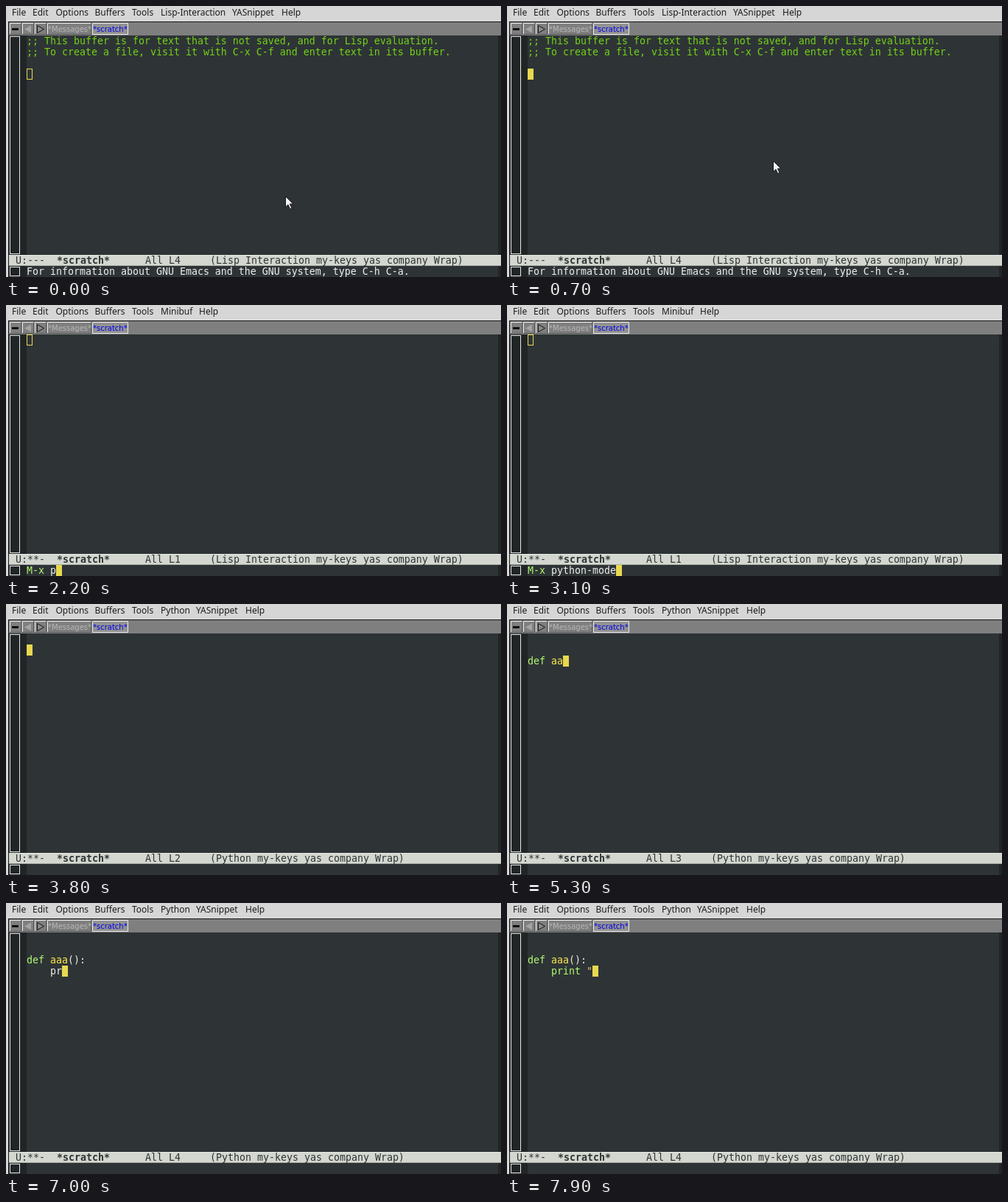
Recreate the animation shown at these times as an HTML page. Size 672 by 368 pixels, loop 8000 ms.

```html
<!DOCTYPE html>
<html lang="en">
<head>
<meta charset="utf-8">
<title>Editor session</title>
<style>
  html, body { margin: 0; width: 100%; height: 100%; overflow: hidden; background: #2e3436; }
  svg { display: block; width: 672px; height: 368px; }
  text { white-space: pre; }
  .mono { font: 13.29px "DejaVu Sans Mono", monospace; fill: #eeeeec; }
  .menu { font: 12px "Noto Sans", "Open Sans", sans-serif; fill: #1c1c1c; }
  .tab { font: 10px "DejaVu Sans", sans-serif; }
  .status { fill: #2e3436; }
  .frame { fill: none; stroke: #e8e8e8; }
</style>
</head>
<body>
<svg viewBox="0 0 672 368">
  <!-- window background and fringes -->
  <rect width="672" height="368" fill="#2e3436"/>
  <rect x="4" y="40" width="24" height="298" fill="#212526"/>
  <rect x="668" y="40" width="4" height="298" fill="#212526"/>
  <rect x="4" y="353" width="24" height="15" fill="#212526"/>
  <rect x="668" y="353" width="4" height="15" fill="#212526"/>

  <!-- menu bar -->
  <rect width="672" height="21" fill="#d6d6d6"/>
  <rect y="20" width="3" height="348" fill="#d6d6d6"/>
  <rect x="3" y="21" width="669" height="1" fill="#161616"/>
  <rect x="3" y="21" width="1" height="347" fill="#161616"/>
  <g id="menu" class="menu"></g>

  <!-- tab bar -->
  <rect x="4" y="22" width="668" height="18" fill="#7f7f7f"/>
  <g class="frame">
    <path d="M5.5 39V23.5H20M22.5 39V23.5H37M39.5 39V23.5H54M56.5 39V23.5H115M118 23.5H165.5V38.5H117.5V23.5"/>
  </g>
  <path d="M5 38.5H20.5V24M22 38.5H37.5V24M39 38.5H54.5V24M56 38.5H115.5V24" fill="none" stroke="#5c5c5c"/>
  <rect x="118" y="24" width="47" height="14" fill="#929292"/>
  <rect x="8" y="30" width="9" height="3" fill="#111"/>
  <path d="M34 26.5V36.5L25 31.5Z" fill="#a4a4a4"/>
  <path d="M42.5 26.5V36.5L51.5 31.5Z" fill="#8a8a8a" stroke="#111"/>
  <text class="tab" x="57" y="35" fill="#b8b8b8">*Messages*</text>
  <text class="tab" x="118" y="35" fill="#0000ee">*scratch*</text>

  <!-- scroll bars -->
  <rect class="frame" x="5.5" y="41.5" width="13" height="295"/>
  <rect class="frame" x="5.5" y="354.5" width="13" height="12"/>

  <!-- mode line -->
  <rect x="4" y="338" width="668" height="15" fill="#d3d7cf"/>
  <rect x="4" y="338" width="668" height="1" fill="#e6e9e2"/>
  <rect x="4" y="352" width="668" height="1" fill="#a9ada5"/>
  <g class="mono">
    <text id="flags" class="status" x="13" y="350"></text>
    <text class="status" x="69" y="350" font-weight="bold">*scratch*</text>
    <text id="place" class="status" x="189" y="350"></text>
    <text id="modes" class="status" x="277" y="350"></text>
  </g>

  <g id="buffer" class="mono"></g>
  <path id="mouse" d="M.5 .5V15L4 11.8L6.6 17.6L9 16.5L6.4 10.9H11Z" fill="#f4f4f4" stroke="#151515"/>
</svg>

<script>
const LOOP = 8000, STEP = 100, COL = 8, ROW = 15, LEFT = 28, TOP = 40, ECHO = 353;
const YELLOW = "#e8d850", GREEN = "#b4fa70", BLUE = "#4f94cd";
const $ = id => document.getElementById(id);

const baseMenu = [[8, "File"], [36, "Edit"], [67.5, "Options"], [120.5, "Buffers"], [171, "Tools"]];
const menus = {
  lisp: [[210, "Lisp-Interaction"], [307, "YASnippet"], [374, "Help"]],
  minibuf: [[210, "Minibuf"], [262, "Help"]],
  python: [[210, "Python"], [258, "YASnippet"], [325, "Help"]]
};
const intro = [
  ";; This buffer is for text that is not saved, and for Lisp evaluation.",
  ";; To create a file, visit it with C-x C-f and enter text in its buffer."
];

// Each step changes part of the editor state at a given time.
const steps = [
  [0, { lines: [...intro, "", ""], row: 3, focus: false, changed: false, menu: "lisp", mode: "Lisp Interaction",
        echo: "For information about GNU Emacs and the GNU system, type C-h C-a.",
        prompt: false, parens: false, pointer: true }],
  [600, { focus: true }],
  [800, { row: 2, echo: "" }],
  [900, { row: 1 }],
  [1000, { row: 0 }],
  [1300, { lines: ["", intro[1], "", ""], changed: true }],
  [1500, { lines: [intro[1], "", ""] }],
  [1600, { lines: [""] }],
  [1900, { prompt: true, menu: "minibuf" }]
];

function type(text, start, gap, patch) {
  [...text].forEach((_, i) => steps.push([start + i * gap, patch(text.slice(0, i + 1))]));
}

type("python-mode", 2100, 100, s => ({ echo: s, pointer: false }));
steps[steps.length - 10][0] = 2300;
steps.push(
  [3400, { prompt: false, echo: "", menu: "python", mode: "Python" }],
  [3700, { lines: ["", ""], row: 1 }],
  [4000, { lines: ["", "", ""], row: 2 }]
);
const define = s => ({ lines: ["", "", s] });
type("def ", 4500, 100, define);
type("aaa", 5000, 200, s => define("def " + s));
type("():", 5600, 200, s => define("def aaa" + s));
steps.push(
  [5900, { parens: true }],
  [6500, { lines: ["", "", "def aaa():", "    "], row: 3, parens: false }]
);
type('print "', 6800, 160, s => ({ lines: ["", "", "def aaa():", "    " + s] }));
steps.sort((a, b) => a[0] - b[0]);

const text = (x, y, s, fill) =>
  `<text x="${x}" y="${y}"${fill ? ` fill="${fill}" style="fill:${fill}"` : ""}>${s}</text>`;
const box = (x, y, w, fill) => `<rect x="${x}" y="${y}" width="${w}" height="${ROW}" fill="${fill}"/>`;

function cursor(col, y, solid) {
  const x = LEFT + col * COL;
  return solid ? box(x, y, COL, YELLOW)
    : `<rect x="${x + .5}" y="${y + .5}" width="${COL - 1}" height="${ROW - 1}" fill="none" stroke="${YELLOW}"/>`;
}

// Splits a line into coloured pieces.
function colored(line, y) {
  if (line.startsWith(";;")) return text(LEFT, y, line, "#73d216");
  let out = "", col = 0;
  for (const part of line.match(/\s+|\w+|".*|[^\s\w"]+/g) || []) {
    const fill = /^(def|print)$/.test(part) ? GREEN
      : line.startsWith("def ") && col === 4 ? "#fce94f"
      : part[0] === '"' ? "#e9b96e" : "";
    if (part.trim()) out += text(LEFT + col * COL, y, part, fill);
    col += part.length;
  }
  return out;
}

function render(t) {
  const s = Object.assign({}, ...steps.filter(e => e[0] <= t).map(e => e[1]));
  let out = s.parens ? box(LEFT + 7 * COL, TOP + 2 * ROW, 2 * COL, BLUE) : "";
  out += cursor(s.lines[s.row].length, TOP + s.row * ROW, s.focus && !s.prompt);
  s.lines.forEach((line, i) => out += colored(line, TOP + i * ROW + 12));
  if (s.prompt) {
    out += text(LEFT, ECHO + 12, "M-x", GREEN) + cursor(4 + s.echo.length, ECHO, true);
  }
  out += text(LEFT + (s.prompt ? 4 * COL : 0), ECHO + 12, s.echo);
  $("buffer").innerHTML = out;

  $("menu").innerHTML = [...baseMenu, ...menus[s.menu]].map(([x, label]) => text(x, 13, label)).join("");
  $("flags").textContent = s.changed ? "U:**-" : "U:---";
  $("place").textContent = "All L" + (s.row + 1);
  $("modes").textContent = `(${s.mode} my-keys yas company Wrap)`;

  const k = Math.min(1, Math.max(0, (t - 100) / 500)), ease = k * k * (3 - 2 * k);
  $("mouse").setAttribute("transform", `translate(${379 - 18 * ease} ${258 - 48 * ease})`);
  $("mouse").setAttribute("visibility", s.pointer ? "visible" : "hidden");
}

let shown = -1;
const begin = performance.now();
function tick() {
  const t = Math.floor(((performance.now() - begin) % LOOP) / STEP) * STEP;
  if (t !== shown) render(shown = t);
  requestAnimationFrame(tick);
}
tick();
</script>
</body>
</html>
```
